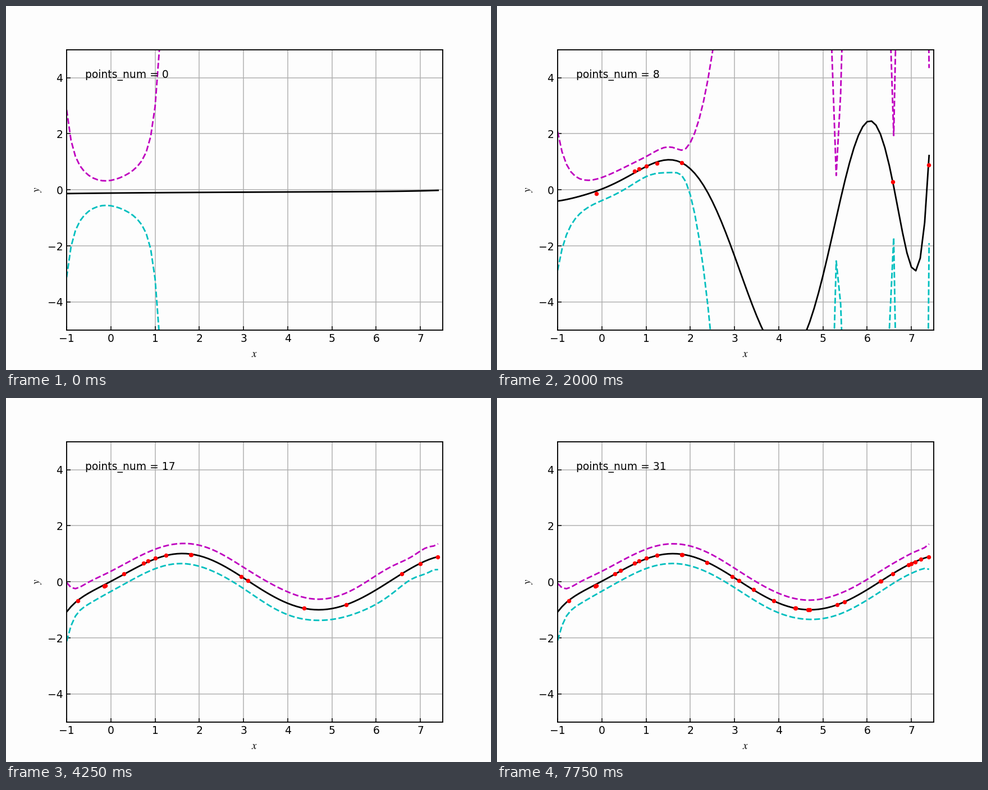
A matplotlib script for the animation above (8 s loop, 864 by 648 pixels).

```python
import matplotlib.pyplot as plt
import numpy as np
from matplotlib.animation import FuncAnimation

plt.rcParams["mathtext.fontset"] = "stix"

DEGREE = 9
ALPHA, BETA = 1.0, 10.0  # prior and noise precision
BACKGROUND = "#fdfdfd"

# Sample positions in the order they arrive
SAMPLES = np.array([
    -0.13, 1.253, 0.841, 1.805, 7.389, 1.012, 6.578, 0.739,
    5.328, 6.991, 3.094, -0.74, 0.295, -0.152, 1.815, 4.37,
    2.954, 4.66, 3.43, 4.706, 4.383, 0.422, 7.08, 2.377,
    6.934, 6.305, 7.207, 3.881, 6.307, 5.493, 4.38, 2.96,
])
VALUES = np.sin(SAMPLES)
GRID = np.arange(-1, 7.45, 0.1)


def features(x):
    return np.vander(x, DEGREE + 1, increasing=True)


def predict(count):
    """Mean and deviation of Bayesian polynomial regression on the grid."""
    phi = features(SAMPLES[:count])
    # Stacking the prior under the data keeps the QR solve stable
    system = np.vstack([np.sqrt(BETA) * phi, np.sqrt(ALPHA) * np.eye(DEGREE + 1)])
    target = np.concatenate([np.sqrt(BETA) * VALUES[:count], np.zeros(DEGREE + 1)])
    q, r = np.linalg.qr(system)
    basis = features(GRID)
    mean = basis @ np.linalg.solve(r, q.T @ target)
    spread = np.linalg.solve(r.T, basis.T)
    return mean, np.sqrt(1 / BETA + (spread ** 2).sum(axis=0))


fig, ax = plt.subplots(figsize=(6.4, 4.8), dpi=135, facecolor=BACKGROUND)
ax.set_facecolor(BACKGROUND)
ax.set_xlim(-1, 7.5)
ax.set_ylim(-5, 5)
ax.set_xticks(range(-1, 8))
ax.set_yticks(range(-4, 5, 2))
ax.tick_params(direction="in")
ax.grid(True)
ax.set_xlabel("$x$")
ax.set_ylabel("$y$")
for spine in ax.spines.values():
    spine.set_linewidth(1.0)

mean_line, = ax.plot([], [], "k-", lw=1.5)
upper_line, = ax.plot([], [], "m--", lw=1.5)
lower_line, = ax.plot([], [], "c--", lw=1.5)
dots, = ax.plot([], [], "r.", ms=6)
label = ax.text(0.05, 0.9, "", transform=ax.transAxes)


def update(n):
    # The fit already includes the sample that is shown next
    mean, dev = predict(n + 1)
    mean_line.set_data(GRID, mean)
    upper_line.set_data(GRID, mean + dev)
    lower_line.set_data(GRID, mean - dev)
    dots.set_data(SAMPLES[:n], VALUES[:n])
    label.set_text(f"points_num = {n}")
    return mean_line, upper_line, lower_line, dots, label


anim = FuncAnimation(fig, update, frames=len(SAMPLES), interval=250,
                     repeat=True, repeat_delay=0, blit=False)
plt.show()
```
